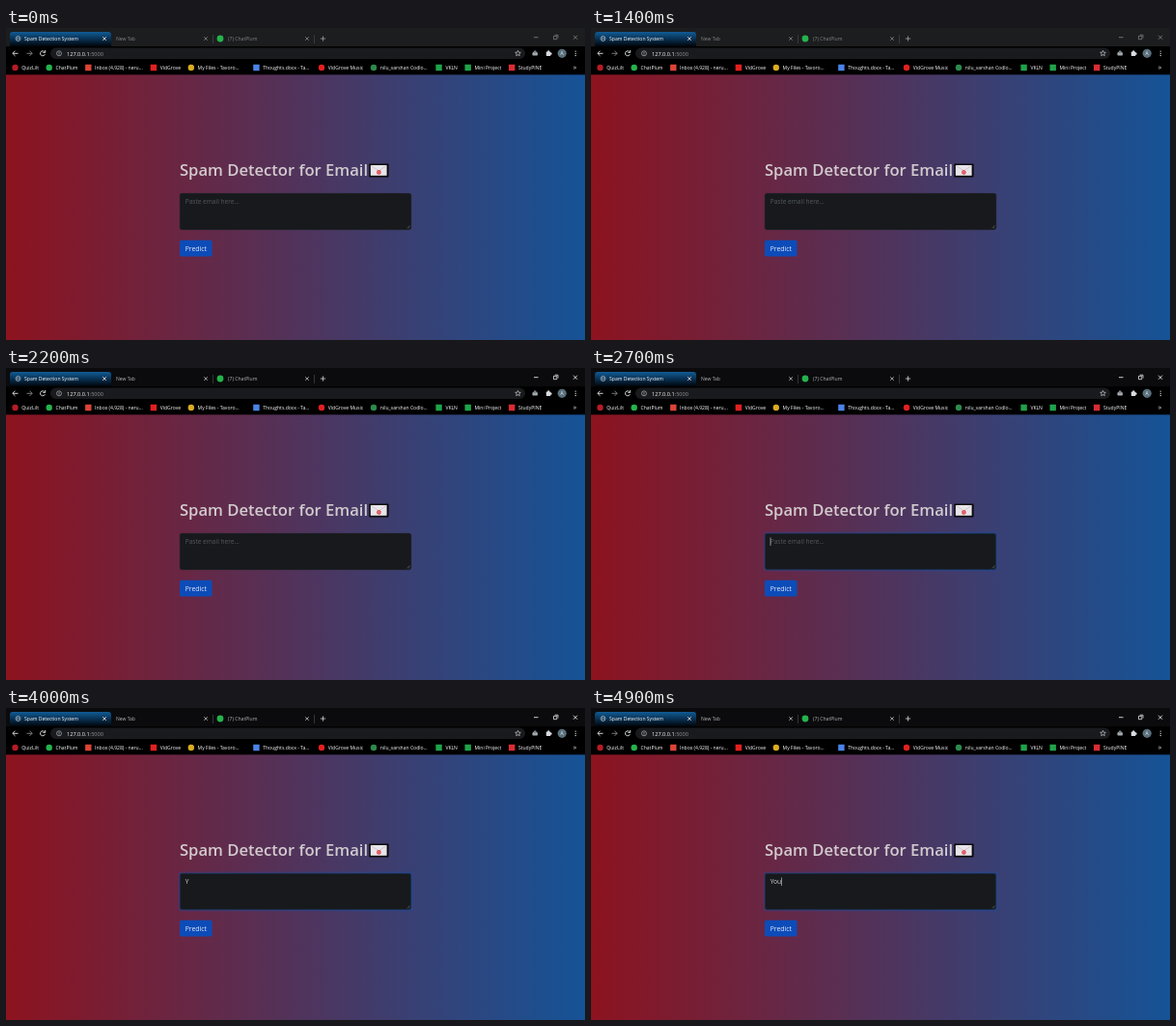
Write an HTML page with a canvas that moves like this. It is 600x323 px and loops after 5000 ms.

```html
<!DOCTYPE html>
<html lang="en">
<head>
<meta charset="utf-8">
<title>Spam Detection System</title>
<style>
  html, body { margin: 0; width: 100%; height: 100%; overflow: hidden; background: #000; }
  canvas { display: block; width: 600px; height: 323px; }
</style>
</head>
<body>
<canvas id="stage"></canvas>
<script>
const W = 600, H = 323, LOOP = 5000, STEP = 100;
const TAB_W = 105, BAR_Y = 26.3, MARK_Y = 41, PAGE_Y = 48.5;
const WINDOW_FOCUS = 2000, FIELD_FOCUS = 2600, BLINK = 530;
const WORD = 'You', KEY_TIMES = [3400, 4300, 4600];
const UI = '"Open Sans", "Noto Sans", sans-serif';

const canvas = document.getElementById('stage');
const ctx = canvas.getContext('2d');
const dpr = window.devicePixelRatio || 1;
canvas.width = W * dpr;
canvas.height = H * dpr;

// Returns the width of the drawn text.
function text(str, x, y, size, color, weight = 400) {
  ctx.font = `${weight} ${size}px ${UI}`;
  ctx.fillStyle = color;
  ctx.fillText(str, x, y);
  return ctx.measureText(str).width;
}

function box(x, y, w, h, fill, r = 0) {
  ctx.fillStyle = fill;
  ctx.beginPath();
  ctx.roundRect(x, y, w, h, r);
  ctx.fill();
}

function frame(x, y, w, h, color, width = 0.7, r = 0) {
  ctx.strokeStyle = color;
  ctx.lineWidth = width;
  ctx.beginPath();
  ctx.roundRect(x, y, w, h, r);
  ctx.stroke();
}

function disc(x, y, r, fill) {
  ctx.fillStyle = fill;
  ctx.beginPath();
  ctx.arc(x, y, r, 0, Math.PI * 2);
  ctx.fill();
}

function arc(x, y, rx, ry, color, width = 0.7, from = 0, to = Math.PI * 2) {
  ctx.strokeStyle = color;
  ctx.lineWidth = width;
  ctx.beginPath();
  ctx.ellipse(x, y, rx, ry, 0, from, to);
  ctx.stroke();
}

function line(color, width, ...points) {
  ctx.strokeStyle = color;
  ctx.lineWidth = width;
  ctx.beginPath();
  for (const [x, y] of points) ctx.lineTo(x, y);
  ctx.stroke();
}

function cross(x, y, r, color) {
  for (const s of [-1, 1]) line(color, 0.8, [x - r, y - s * r], [x + r, y + s * r]);
}

function plus(x, y, r, color) {
  line(color, 0.8, [x - r, y], [x + r, y]);
  line(color, 0.8, [x, y - r], [x, y + r]);
}

function arrow(x, y, dir, color) {
  const tip = x + dir * 2.8;
  line(color, 0.9, [x - dir * 2.8, y], [tip, y]);
  line(color, 0.9, [tip - dir * 2.6, y - 2.6], [tip, y], [tip - dir * 2.6, y + 2.6]);
}

function star(x, y, r, color) {
  const points = Array.from({ length: 11 }, (_, i) => {
    const a = i * Math.PI / 5 - Math.PI / 2, d = i % 2 ? r * 0.45 : r;
    return [x + d * Math.cos(a), y + d * Math.sin(a)];
  });
  line(color, 0.7, ...points);
}

function gradient(x0, y0, x1, y1, ...colors) {
  const g = ctx.createLinearGradient(x0, y0, x1, y1);
  colors.forEach((c, i) => g.addColorStop(i / (colors.length - 1), c));
  return g;
}

function globe(x, y, r) {
  for (const rx of [r, r * 0.45]) arc(x, y, rx, r, '#a3b1bc', 0.6);
  line('#a3b1bc', 0.5, [x - r, y], [x + r, y]);
}

function tabs(active) {
  const left = i => 4 + i * TAB_W;
  const dim = active ? '#b4b6b8' : '#838587';
  box(0, 0, W, 19, active ? '#0b0b0d' : '#1c1d1f');
  box(left(0), 4, TAB_W, 15, gradient(0, 4, 0, 19, '#115c96', '#082f50', '#01050a'), [3, 3, 0, 0]);
  globe(left(0) + 8.5, 11, 2.6);
  disc(left(2) + 8, 11, 3.4, '#25b34c');

  text('Spam Detection System', left(0) + 15, 13, 5.07, '#fff');
  text('New Tab', left(1) + 5, 13, 5, dim);
  text('(7) ChatPlum', left(2) + 16, 13, 5.1, dim);
  for (let i = 0; i < 3; i++) {
    cross(left(i) + 98, 11, 1.8, i ? dim : '#f0f2f4');
    if (i) line('#46484b', 0.7, [left(i + 1) + 0.5, 7], [left(i + 1) + 0.5, 16]);
  }
  plus(left(3) + 9.5, 11, 2.6, active ? '#d5d7d9' : '#a0a2a4');
}

function windowButtons(active) {
  const color = active ? '#fff' : '#858688', y = 9.7;
  line(color, 0.8, [547, y], [551.5, y]);
  frame(567.5, y - 1.3, 3.3, 3.3, color);
  line(color, 0.7, [568.7, y - 2.5], [572, y - 2.5], [572, y + 0.8]);
  cross(590, y, 2, color);
}

function toolbar() {
  box(0, 19, W, PAGE_Y - 19, '#000');
  arrow(9.7, BAR_Y, -1, '#e4e6e8');
  arrow(24.3, BAR_Y, 1, '#85888b');
  arc(38, BAR_Y, 2.5, 2.5, '#e4e6e8', 0.9, 0.3, 5.5);
  line('#e4e6e8', 0.9, [40.7, 23], [40.7, 25.4], [38.3, 25.4]);

  box(46, 20.5, 492, 11.5, '#191a1d', 5.75);
  arc(55, BAR_Y, 2.5, 2.5, '#b4b8bc');
  line('#b4b8bc', 0.7, [55, BAR_Y - 1.4], [55, BAR_Y + 1.4]);
  const host = text('127.0.0.1', 63, 28.5, 5.6, '#f4f5f6');
  text(':5000', 63 + host, 28.5, 5.6, '#8f9296');
  star(530.5, BAR_Y, 3, '#c9ccd0');

  const slot = i => 548.2 + i * 14;
  box(slot(0) - 2.7, 25, 5.4, 3.6, '#a4aaae', 1.2);
  disc(slot(0), 24.8, 1.5, '#7d8488');
  box(slot(1) - 2.4, 24.6, 4.6, 4.3, '#d9dbde', 0.6);
  for (const a of [0, -Math.PI / 2]) disc(slot(1) + 2.4 * Math.cos(a), 26.7 + 2.4 * Math.sin(a), 1.1, '#d9dbde');
  disc(slot(2), BAR_Y, 4.6, '#596f7c');
  text('A', slot(2) - 1.6, 28.2, 5, '#edf1f3');
  for (const d of [-1, 0, 1]) disc(slot(3), BAR_Y + d * 2.2, 0.65, '#e4e6e8');
}

const BOOKMARKS = [
  ['QuizLilt', '#b51c26', 'round'],
  ['ChatPlum', '#25b34c', 'round'],
  ['Inbox (4,928) - neru...', '#db4437'],
  ['VidGrove', '#e32020'],
  ['My Files - Tavoro...', '#d9ac21', 'round'],
  ['Thoughts.docx - Ta...', '#4a83e8'],
  ['VidGrove Music', '#e32020', 'round'],
  ['nilu_varshan Codlo...', '#2d8a4d', 'round'],
  ['VKLN', '#1fa34a'],
  ['Mini Project', '#1fa34a'],
  ['StudyPINE', '#d92c35']
];

// Shortened labels take the full label width, the others their own.
function bookmarks() {
  const full = 50, gap = 17.6;
  let x = 16.3;
  for (const [label, color, round] of BOOKMARKS) {
    box(x - 10, MARK_Y - 3.2, 6.4, 6.4, color, round ? 3.2 : 0.5);
    const width = text(label, x, 42.8, 5.05, '#fff');
    x += gap + (label.endsWith('...') ? full : width);
  }
  text('»', 587.8, 43, 7, '#e4e6e8');
}

function envelope(t) {
  const x = 376.3, y = 140.4, w = 20.2, h = 14.2, mid = x + w / 2;
  box(x, y, w, h, '#08080a', 0.8);
  box(x + 1.5, y + 1.6, w - 3.4, h - 3.4, '#e6e5ea');
  line('#c9b0b6', 0.6, [x + 1.8, y + 2], [mid, y + 7.5], [x + w - 2.2, y + 2]);
  ctx.save();
  ctx.translate(mid, y + 9);
  ctx.rotate(0.35 * Math.sin(t / LOOP * Math.PI * 10));
  disc(0, 0, 2.3, '#dc3f47');
  arc(0, 0, 1, 1, '#efb3b7', 0.5);
  ctx.restore();
}

function field(t) {
  const x = 180, y = 171, w = 240, h = 38, pad = 5.7;
  const focus = Math.min(1, Math.max(0, (t - FIELD_FOCUS + STEP) / 150));
  box(x - 1.5, y - 1.5, w + 3, h + 3, `rgba(13, 80, 190, ${0.25 * focus})`, 3);
  box(x, y, w, h, '#17191c', 2.4);
  const mix = (a, b) => a + (b - a) * focus;
  frame(x + 0.3, y + 0.3, w - 0.6, h - 0.6, `rgb(${mix(37, 25)}, ${mix(37, 66)}, ${mix(42, 114)})`, 0.6, 2.3);
  for (const d of [1.4, 3]) line('#777a7d', 0.5, [x + w - 1.5 - d, y + h - 1.6], [x + w - 1.5, y + h - 1.6 - d]);

  const count = KEY_TIMES.filter(at => t >= at).length;
  const typed = WORD.slice(0, count);
  const since = count ? KEY_TIMES[count - 1] : FIELD_FOCUS;
  if (!count) text('Paste email here...', x + pad, y + 11.3, 6.55, '#54585c');
  const width = text(typed, x + pad, y + 11.3, 6.6, '#d2d4d6');
  if (focus && Math.floor((t - since) / BLINK) % 2 === 0) {
    box(x + pad + width, y + 4.6, 0.6, 8.4, '#d5d7d9');
  }
}

function page(t) {
  box(0, PAGE_Y, W, H - PAGE_Y, gradient(0, 0, W, 0, 'rgb(141,19,31)', 'rgb(21,83,151)'));
  text('Spam Detector for Email', 180, 153.4, 16.6, '#d2cbce', 600);
  envelope(t);
  field(t);
  box(180, 219.8, 33.5, 16.7, '#0c4cb9', 1.8);
  text('Predict', 185.7, 230.5, 6.85, '#e6ebf4');
}

function draw(now) {
  const t = Math.floor(now % LOOP / STEP) * STEP;
  const active = t >= WINDOW_FOCUS;
  ctx.setTransform(dpr, 0, 0, dpr, 0, 0);
  tabs(active);
  windowButtons(active);
  toolbar();
  bookmarks();
  page(t);
}

const start = performance.now();
function tick() {
  draw(performance.now() - start);
  requestAnimationFrame(tick);
}
tick();
</script>
</body>
</html>
```
